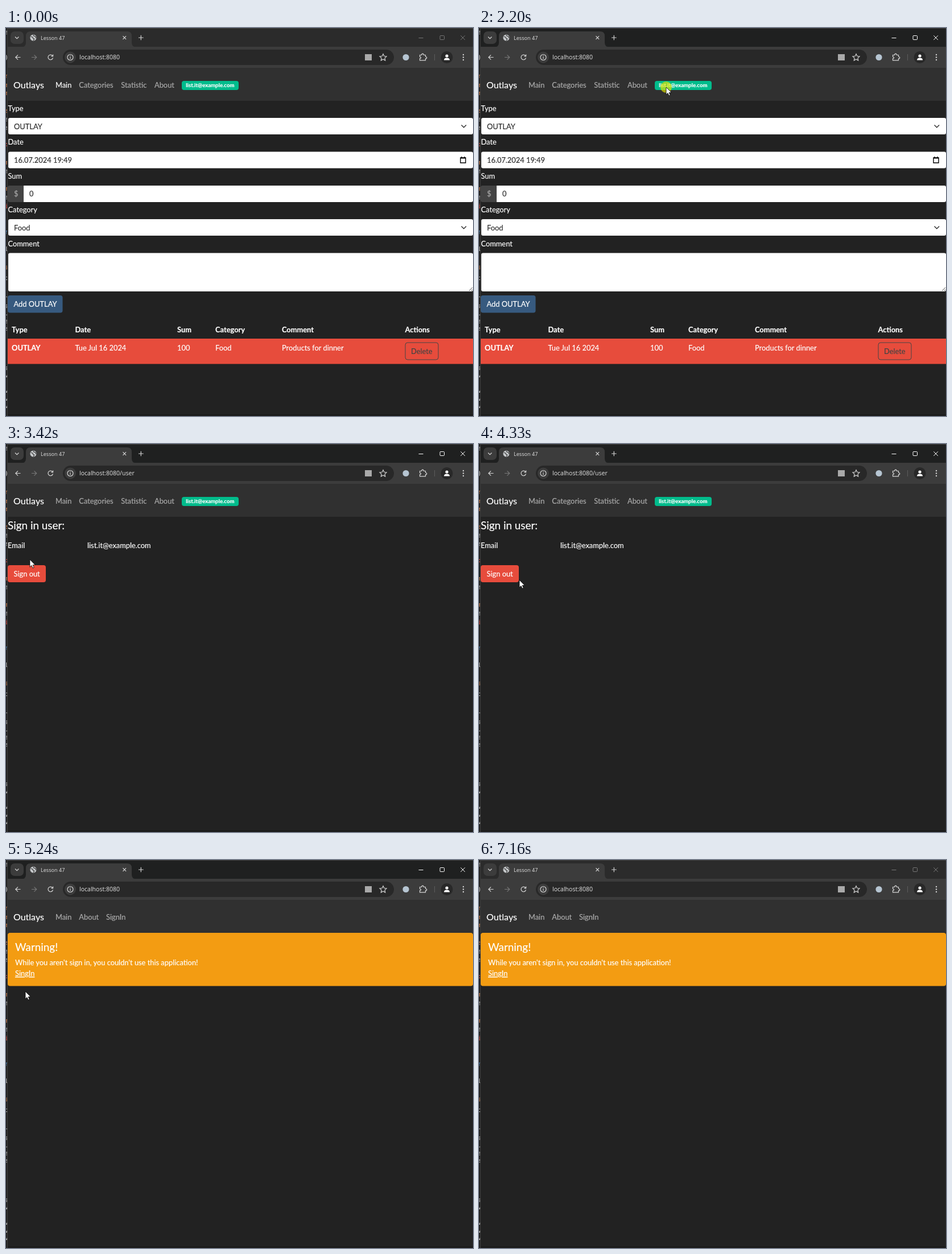
Recreate the animation shown at these times as an HTML page. Size 821x682 px, loop 7260 ms.

```html
<!DOCTYPE html>
<html lang="en">
<head>
<meta charset="utf-8">
<title>Outlays</title>
<style>
  html, body { margin: 0; width: 100%; height: 100%; overflow: hidden; background: #222; }
  svg { display: block; width: 821px; height: 682px; }
  text {
    font: 12.85px Lato, sans-serif; white-space: pre;
    color: #fff; fill: currentColor; stroke: currentColor; stroke-width: .18;
  }
  .bold { font-weight: 700; }
  .h4 { font-size: 18.9px; }
  .link { color: #acacac; }
  .field { fill: #fff; }
  .value { color: #303030; }
  .ui { font: 10.55px "Open Sans", "Noto Sans", sans-serif; color: #e3e3e3; stroke: none; }
  .code { font: 11px "DejaVu Sans Mono", monospace; text-anchor: end; }
  .line { fill: none; stroke: #d5d5d5; stroke-width: 1.2; }
  .dark { fill: none; stroke: #303030; stroke-width: 1.4; }
</style>
</head>
<body>
<svg viewBox="0 0 821 682">
  <rect width="821" height="682" fill="#1e1e1e"/>
  <g id="code"></g>

  <!-- browser window -->
  <rect x="3" width="818" height="682" fill="#222"/>
  <rect id="title" x="3" width="818" height="34"/>
  <path d="M3 .5H821M2.5 0V682" stroke="#414141" fill="none"/>
  <rect x="3" y="33" width="818" height="37.5" fill="#3c3c3c"/>
  <rect x="8" y="6" width="23" height="22" rx="7" fill="#3c3c3c"/>
  <path class="line" d="M16 15.5l3.2 3.2 3.2-3.2"/>
  <path d="M27 33.5q8 0 8-8V14q0-8 8-8H213q8 0 8 8V25.5q0 8 8 8z" fill="#3c3c3c"/>
  <circle cx="48" cy="17" r="5.6" fill="#c4c7c9"/>
  <path d="M43.5 15l3 1 1 2 2 1-1 3M48 12l1 2 3 1 1 3" stroke="#3c3c3c" stroke-width="1.3" fill="none"/>
  <text class="ui" x="61" y="20.5" style="font-size:9.1px">Lesson 47</text>
  <path class="line" d="M205.5 14.2l5.6 5.6m0-5.6l-5.6 5.6M233 17h8.6M237.3 12.7v8.6"/>
  <g id="controls" fill="none">
    <path d="M725.5 17.5h8M799.3 13.3l7.6 7.6m0-7.6l-7.6 7.6"/>
    <rect x="763" y="13.5" width="7.5" height="7" rx="1"/>
  </g>

  <rect x="100" y="38" width="582" height="27" rx="13.5" fill="#282828"/>
  <path class="line" d="M25.5 51.5H17m4-4.2l-4.2 4.2 4.2 4.2"/>
  <path class="line" d="M45 51.5h8.5m-4-4.2l4.2 4.2-4.2 4.2" style="stroke:#777"/>
  <path class="line" d="M82 49.2a4.3 4.3 0 1 0 .5 3.2M82.6 46.5v3.2h-3.2"/>
  <circle cx="113" cy="51.5" r="10" fill="#3c3c3c"/>
  <circle class="line" cx="113" cy="51.5" r="5"/>
  <path class="line" d="M113 50.8v3.4M113 48.3v1.2"/>
  <text class="ui" id="url" x="129" y="55"></text>
  <rect x="631" y="46" width="12" height="11" fill="#a9a9a9"/>
  <path class="line" d="M663 45.6l1.8 3.9 4.2.5-3.1 2.9.8 4.2-3.7-2.1-3.7 2.1.8-4.2-3.1-2.9 4.2-.5z"/>
  <circle cx="703" cy="51.5" r="5.6" fill="#b6c5d2"/>
  <path class="line" d="M727.5 47.5h3.2q0-2.4 1.8-2.4t1.8 2.4h3.2v3q2.2 0 2.2 1.7t-2.2 1.7v3h-10v-3.2q2-.2 2-1.5t-2-1.5z"/>
  <path d="M753.5 46v11" stroke="#5d5d5d"/>
  <circle cx="775" cy="51.5" r="10.5" fill="#282828"/>
  <circle cx="775" cy="49" r="2.6" fill="#fff"/>
  <path d="M770 56.5q0-4 5-4t5 4z" fill="#fff"/>
  <g fill="#d5d5d5"><circle cx="804" cy="47" r="1.2"/><circle cx="804" cy="51.5" r="1.2"/><circle cx="804" cy="56" r="1.2"/></g>

  <!-- navigation -->
  <rect x="3" y="70.5" width="818" height="57.5" fill="#303030"/>
  <text x="13" y="106" style="font-size:16px">Outlays</text>
  <text class="link" id="main" x="87" y="104.5">Main</text>
  <g id="member">
    <text class="link" x="128.3" y="104.5">Categories</text>
    <text class="link" x="202.3" y="104.5">Statistic</text>
    <text class="link" x="261" y="104.5">About</text>
    <rect x="309" y="93" width="100" height="16" rx="4" fill="#00bc8c"/>
    <text class="bold" x="358.8" y="104" text-anchor="middle" style="font-size:9.6px">list.it@example.com</text>
  </g>
  <g id="guest">
    <text class="link" x="128.3" y="104.5">About</text>
    <text class="link" x="176" y="104.5">SignIn</text>
    <rect x="3" y="128" width="818" height="93.5" rx="4" fill="#f39c12"/>
    <text class="h4" x="16" y="160">Warning!</text>
    <text x="16" y="184.5">While you aren't sign in, you couldn't use this application!</text>
    <text x="16" y="204" text-decoration="underline">SingIn</text>
  </g>

  <g id="home">
    <text x="3.5" y="146">Type</text>
    <text x="3.5" y="205.3">Date</text>
    <text x="3.5" y="264.7">Sum</text>
    <text x="3.5" y="324">Category</text>
    <text x="3.5" y="383.5">Comment</text>
    <rect class="field" x="4" y="158" width="817" height="29" rx="3"/>
    <rect class="field" x="4" y="217.5" width="817" height="29" rx="3"/>
    <rect x="3" y="277" width="32" height="29" rx="3" fill="#444"/>
    <path class="field" d="M31 277H818q3 0 3 3V303q0 3-3 3H31z"/>
    <rect class="field" x="4" y="336" width="817" height="29" rx="3"/>
    <rect class="field" x="4" y="395.5" width="817" height="67.5" rx="3"/>
    <text class="value" x="14" y="177.5">OUTLAY</text>
    <text class="value" x="14" y="236.8">16.07.2024 19:49</text>
    <text x="14" y="296" style="color:#aaa">$</text>
    <text class="value" x="41" y="296">0</text>
    <text class="value" x="14" y="355.5">Food</text>
    <path class="dark" d="M800.5 170.5l4.3 4.3 4.3-4.3M800.5 348.5l4.3 4.3 4.3-4.3"/>
    <path class="dark" d="M799 228h9v9h-9zM799 228.8h9M801 226v2M806 226v2" style="stroke:#000"/>
    <path d="M814 462l6-6M817.5 462l2.5-2.5" stroke="#555" fill="none"/>
    <rect x="3" y="470" width="96.5" height="30.5" rx="4" fill="#375a7f"/>
    <text x="13.5" y="490">Add OUTLAY</text>
    <g id="head"></g>
    <rect x="3" y="546" width="818" height="44.5" fill="#e74c3c"/>
    <g id="row"></g>
    <rect x="702" y="553" width="58" height="30" rx="4" fill="none" stroke="#444"/>
    <text x="712" y="573" style="color:#444">Delete</text>
  </g>

  <g id="user">
    <text class="h4" x="3" y="149.5">Sign in user:</text>
    <text x="3" y="183">Email</text>
    <text x="143" y="183">list.it@example.com</text>
    <rect id="signout" x="3" y="213" width="67" height="30" rx="4"/>
    <text x="13.5" y="232.8">Sign out</text>
  </g>
  <rect x="3" y="679" width="818" height="3" fill="#1b1b1b"/>

  <g id="cursor" fill="#fff" stroke="#000" stroke-width=".8" stroke-linejoin="round">
    <circle id="click" r="10" fill="#e6e600" fill-opacity=".65" stroke="none"/>
    <path id="arrow" d="M0 0V13.2L3 10.4 5 15 7.2 14 5.2 9.6H9.4z"/>
    <path id="hand" d="M0 3q1.5-3 3 0v5l6 1.3q1.7.5 1.2 3l-1 4V19H2.3l-1-2.5L-2.8 12q-.5-2 1.4-1.6L0 11.7z"/>
  </g>
</svg>
<script>
const LOOP = 7260;
const $ = id => document.getElementById(id);
const show = (id, on) => $(id).style.display = on ? '' : 'none';

function addText(parent, x, y, content, cls, color) {
  const el = document.createElementNS('http://www.w3.org/2000/svg', 'text');
  el.setAttribute('x', x);
  el.setAttribute('y', y);
  el.setAttribute('class', cls);
  if (color) el.style.color = color;
  el.textContent = content;
  $(parent).append(el);
}

// table
const columns = [10, 121.5, 301, 368, 485, 701.5];
['Type', 'Date', 'Sum', 'Category', 'Comment', 'Actions']
  .forEach((s, i) => addText('head', columns[i], 534.5, s, 'bold'));
['OUTLAY', 'Tue Jul 16 2024', '100', 'Food', 'Products for dinner']
  .forEach((s, i) => addText('row', columns[i], 567, s, i ? '' : 'bold'));

// sliver of the editor behind the window: baseline, letter, ink
const inks = { o: '#c77a4a', w: '#b5b5b5', b: '#4a86c0', r: '#b8443c' };
('11aw 55)w 88ro 104mo 118mo 149eo 164aw 179aw 208:r 240mo 255aw 286mo 301aw 317ir ' +
 '362rb 392lw 424so 443pw 478nw 492sw 505uw 519aw 532aw 601sw 614vw 641vw 655vw 668vw')
  .split(' ').forEach(s => {
    const [, y, letter, ink] = s.match(/(\d+)(.)(.)/);
    addText('code', 4, y, letter, 'code', inks[ink]);
  });

// pointer moves: first step, last step, number of steps, way points, easing
const linear = u => u;
const smooth = u => u * u * (3 - 2 * u);
const easeOut = u => 1 - (1 - u) ** 1.85;
const moves = [
  [400, 700, 4, [[440, 700], [377, 514]], easeOut],
  [900, 1600, 8, [[377, 514], [328, 111]], easeOut],
  [1700, 1800, 2, [[328, 111], [329, 104]], linear],
  [3020, 3520, 6, [[329, 104], [19, 211]], smooth],
  [3920, 4630, 8, [[19, 211], [24, 200], [40, 170], [60, 157], [83, 185],
                   [71, 239], [60, 243], [46, 238], [34, 231]], linear],
  [5650, 6350, 8, [[34, 231], [785, 690]], smooth]
];

function pointer(t) {
  const move = moves.filter(m => t >= m[0]).pop();
  if (!move) return [440, 700];
  const [start, end, steps, pts, ease] = move;
  const step = Math.floor((t - start) / (end - start) * (steps - 1) + 1e-6) + 1;
  const pos = ease(Math.min(step / steps, 1)) * (pts.length - 1);
  const i = Math.min(Math.floor(pos), pts.length - 2);
  return pts[i].map((v, axis) => v + (pts[i + 1][axis] - v) * (pos - i));
}

const inside = ([x, y], l, t, r, b) => x >= l && x <= r && y >= t && y <= b;

function draw(t) {
  const page = t < 2310 ? 'home' : t < 5240 ? 'user' : 'guest';
  const active = t >= 2200 && t < 7160;
  for (const id of ['home', 'user', 'guest']) show(id, id === page);
  show('member', page !== 'guest');
  $('url').textContent = 'localhost:8080' + (page === 'user' ? '/user' : '');
  $('title').style.fill = active ? '#1f2020' : '#2b2b2b';
  $('controls').style.stroke = active ? '#fff' : '#777';
  $('main').style.color = t < 100 ? '#fff' : '';

  const at = pointer(t);
  const onButton = page === 'user' && inside(at, 3, 213, 70, 243);
  const onBadge = page === 'user' && inside(at, 309, 93, 409, 109);
  $('signout').style.fill = onButton ? '#c44133' : '#e74c3c';
  $('cursor').setAttribute('transform', `translate(${at})`);
  show('hand', onButton || onBadge);
  show('arrow', !onButton && !onBadge);
  show('click', t >= 2200 && t < 2310 || t >= 5140 && t < 5240);
}

const began = performance.now();
function tick() {
  draw((performance.now() - began) % LOOP);
  requestAnimationFrame(tick);
}
tick();
</script>
</body>
</html>
```
